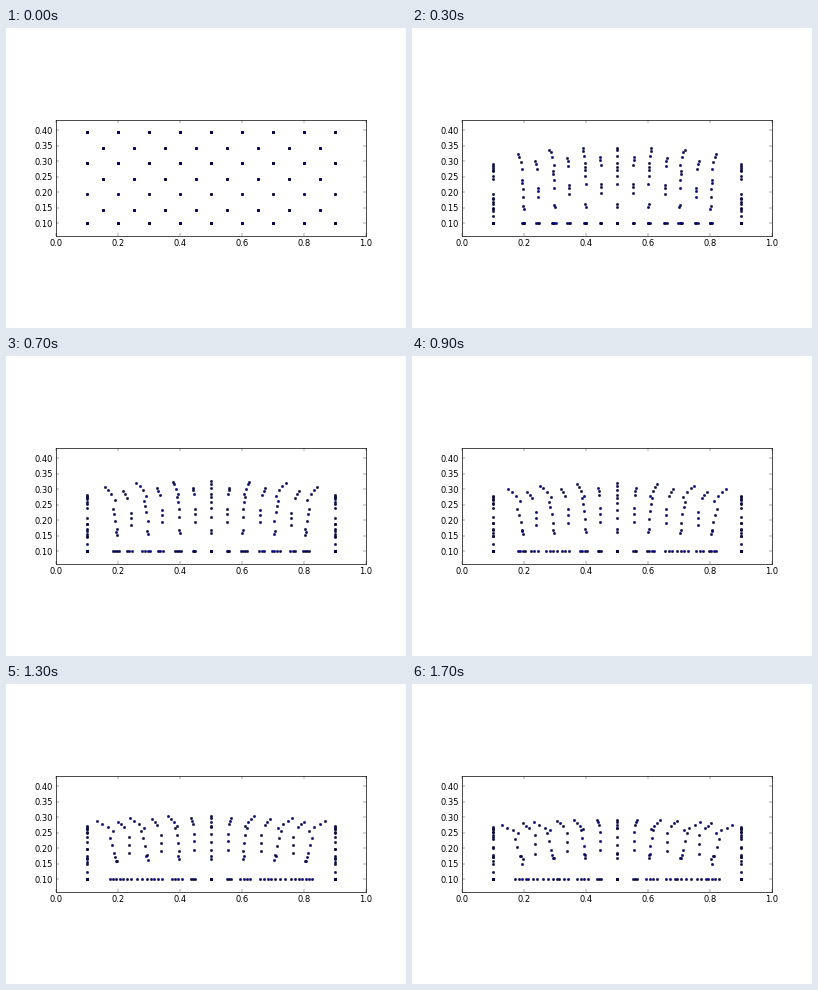
Write a matplotlib script that moves like this. It is 400 px wide and 300 px high and loops after 1800 ms.

```python
import numpy as np
import matplotlib.pyplot as plt
from matplotlib.animation import FuncAnimation

FRAMES, INTERVAL = 18, 100
IMPACT = 2               # frame at which the quick first fall is over
GROUND, WALL = 0.1, 0.4  # floor height, wall distance from the centre

# Layers: start height, copies, height after impact, height at rest,
# gap between resting copies, outward pull, pull lost per copy, edge sag
EVEN = [
    (0.395, 4, 0.351, 0.293, 0.009, 1.00, 0.25, 1),
    (0.295, 4, 0.285, 0.265, 0.027, 0.40, 0.10, 2),
    (0.195, 2, 0.160, 0.182, 0.012, 0.15, 0.10, 0.3),
]
ODD = [
    (0.345, 3, 0.316, 0.293, 0.008, 0.75, 0.15, 1),
    (0.245, 3, 0.224, 0.255, 0.030, 0.22, 0.00, 1),
]

plt.rcParams.update({"font.family": "DejaVu Sans", "font.size": 12,
                     "axes.linewidth": 1.0})


def build_dots():
    """Rows of: offset, start y, impact y, rest y, outward shift."""
    dots = []
    for i in range(17):
        offset = 0.05 * i - WALL
        d = abs(offset)
        near_wall = d > 0.33
        sag_hit = 0.054 * (d / WALL) ** 3.2
        sag_rest = 0.030 * (d / WALL) ** 2
        reach = 0.073 * np.sin(np.pi / 2 * d / 0.27)

        for y, n, hit, rest, gap, pull, loss, sag in (ODD if i % 2 else EVEN):
            for j in range(n):
                shift = 0.25 if near_wall else reach * (pull - loss * j)
                dots.append((offset, y, hit - 0.008 * j ** 1.7 - sag * sag_hit,
                             rest - gap * j - sag * sag_rest, shift))

        # Lowest nodes slide apart along the floor
        reach = 0.04 * np.sin(np.pi * d / WALL)
        for j in range(3 if i % 2 else 4):
            shift = 0.25 if near_wall else reach * (1 - 0.4 * j)
            dots.append((offset, 0.145 if i % 2 else GROUND,
                         GROUND, GROUND, shift))
    return np.array(dots).T


OFFSET, START, HIT, REST, SHIFT = build_dots()


def positions(frame):
    fall = 1 - (1 - min(frame / IMPACT, 1)) ** 1.8
    settle = max(frame - IMPACT, 0) / (FRAMES - 1 - IMPACT)
    spread = np.sin(np.pi / 2 * frame / (FRAMES - 1))

    y = START + fall * (HIT - START) + settle ** 0.8 * (REST - HIT)
    x = OFFSET + np.sign(OFFSET) * SHIFT * spread
    return 0.5 + np.clip(x, -WALL, WALL), np.maximum(y, GROUND)


fig = plt.figure(figsize=(8, 6), dpi=50, facecolor="white")
ax = fig.add_axes([0.125, 0.1, 0.775, 0.8])
ax.set_aspect("equal")
ax.set_xlim(0, 1)
ax.set_ylim(0.0605, 0.433)
ax.set_xticks(np.arange(0, 1.01, 0.2))
ax.set_yticks(np.arange(0.10, 0.41, 0.05))
ax.xaxis.set_major_formatter("{x:.1f}")
ax.yaxis.set_major_formatter("{x:.2f}")
ax.tick_params(direction="in", top=True, right=True, length=4, width=0.5, pad=4)

dots, = ax.plot([], [], ".", ms=7, mfc="#0000a0", mec="black", mew=0.5)


def draw(frame):
    dots.set_data(*positions(frame))
    return dots,


anim = FuncAnimation(fig, draw, frames=FRAMES, interval=INTERVAL,
                     repeat=True, repeat_delay=0)
plt.show()
```
